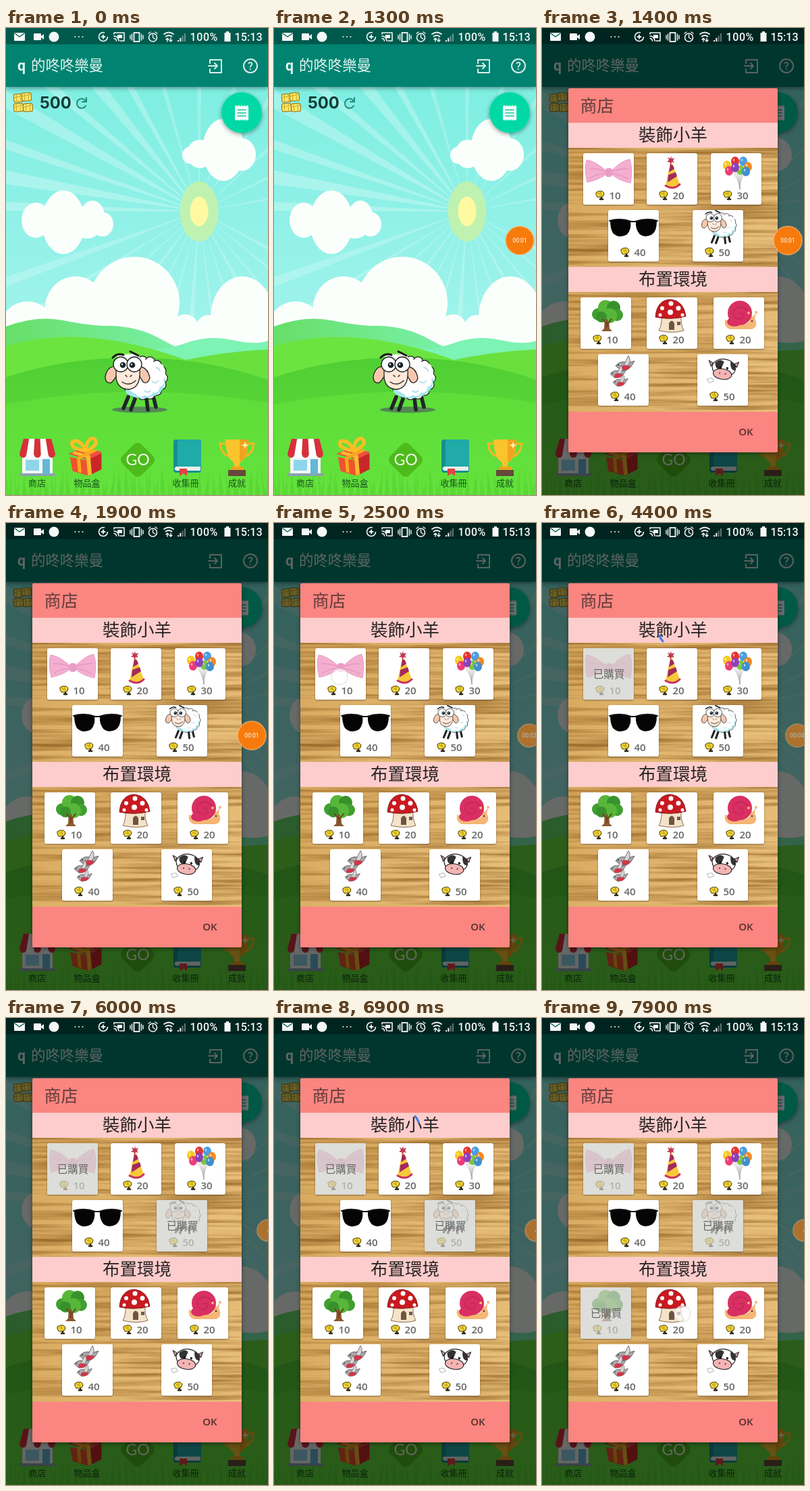
Animation, 388 px wide and 690 px high, one loop 8 s. Source, as an HTML page:

```html
<!DOCTYPE html>
<html lang="zh-Hant">
<head>
<meta charset="utf-8">
<style>
html,body{margin:0;width:100%;height:100%;overflow:hidden;background:#000}
svg{display:block;width:100vw;height:100vh}
text{font-family:"Noto Sans CJK TC","Noto Sans CJK",Roboto,sans-serif}
.latin{font-family:Roboto,sans-serif}
.price{font:600 15px "Open Sans",sans-serif;fill:#666}
.mid{text-anchor:middle}
.line{fill:none;stroke-linecap:round;stroke-linejoin:round}
</style>
</head>
<body>
<svg id="stage" viewBox="0 0 388 690" preserveAspectRatio="none"></svg>
<script>
let seed = 11;
const rand = () => (seed = seed * 16807 % 2147483647) / 2147483647;
const range = (n, f) => Array.from({length: n}, (_, i) => f(i)).join('');
const rect = (x, y, w, h, fill, more = '') => `<rect x="${x}" y="${y}" width="${w}" height="${h}" fill="${fill}" ${more}/>`;
const oval = (x, y, rx, ry, fill, more = '') => `<ellipse cx="${x}" cy="${y}" rx="${rx}" ry="${ry}" fill="${fill}" ${more}/>`;
const dot = (x, y, r, fill, more = '') => oval(x, y, r, r, fill, more);
const path = (d, fill, more = '') => `<path d="${d}" fill="${fill}" ${more}/>`;
const line = (d, color, w = 1, more = '') => `<path class="line" d="${d}" stroke="${color}" stroke-width="${w}" ${more}/>`;
const text = (x, y, size, fill, s, more = '') => `<text x="${x}" y="${y}" font-size="${size}" fill="${fill}" ${more}>${s}</text>`;
const group = (s, more = '') => `<g ${more}>${s}</g>`;
const ink = 'stroke="#222" stroke-width="1.3"';

function ray(angle, spread, opacity) {
  const p = a => `${286 + 480 * Math.cos(a * Math.PI / 180)} ${271 + 480 * Math.sin(a * Math.PI / 180)}`;
  return path(`M286 271L${p(angle - spread)}L${p(angle + spread)}Z`, '#fff', `opacity="${opacity}"`);
}

function sky() {
  const wide = [181.5, 190, 199, 210, 220, 231, 241].map((a, i) => ray(a, i % 2 ? 2 : 1.3, .26)).join('');
  const thin = range(13, i => ray(28 + i * 11, i % 3 ? .7 : 1.3, .2)) + range(7, i => ray(254 + i * 16, 1, .2));
  const puffs = [
    [85, 287, 32, 47], [44, 284, 21, 26], [128, 278, 18, 23], [143, 290, 16, 18], [120, 294, 20, 17],
    [322, 180, 31, 46], [287, 186, 19, 21], [274, 188, 13, 13], [349, 187, 21, 24],
    [190, 406, 67, 68], [103, 414, 45, 47], [32, 447, 42, 43], [265, 443, 20, 20], [300, 442, 18, 18], [350, 428, 47, 61]
  ].map(p => oval(...p, '#fbfffc')).join('');
  return rect(0, 80, 388, 420, 'url(#sky)') + wide + thin
    + oval(286, 271, 28.5, 44.5, '#bff2b0') + oval(286, 271, 13.5, 22, '#fffaa2')
    + puffs + rect(0, 440, 388, 40, '#fbfffc');
}

function land() {
  const blades = range(110, i => {
    const x = i * 3.6, h = 8 + rand() * 28;
    return path(`M${x - 2} 690L${x + rand() * 8 - 4} ${682 - h}L${x + 3} 690Z`, i % 3 ? '#52cf30' : '#6be344', 'opacity=".5"');
  });
  return path('M0 441Q45 424 85 432T150 440Q195 440 230 460T300 486V530H0Z', 'url(#far)')
    + path('M215 476Q240 474 265 466Q300 453 335 461T388 462V540H215Z', '#7df3b4')
    + path('M388 475Q310 478 225 500V550H388Z', '#6ae03f')
    + path('M0 470Q115 435 265 490L290 530H0Z', '#6ce440')
    + path('M0 516Q90 486 195 487T388 520V690H0Z', 'url(#hill)')
    + path('M0 556Q190 520 388 554V690H0Z', '#64e33c', 'opacity=".65"')
    + blades;
}

function sheep() {
  const bump = (i, more) => {
    const a = i * Math.PI * 2 / 15;
    return dot(205 + 27 * Math.cos(a), 517 + 25 * Math.sin(a), 7.3, '#fff', more);
  };
  const eye = (x, y, px) => dot(x, y, 11, '#fff', ink) + dot(px, y + 1, 4.3, '#17242c') + dot(px - 1, y, 1.2, '#fff');
  const legs = 'M181 545L174 562M191 548L185 564M208 547L210 564M218 544L222 560';
  return line(legs, '#202425', 5.5) + range(15, i => bump(i, ink)) + oval(205, 517, 29, 27, '#fff')
    + line('M233 518Q233 541 206 544Q188 545 180 537', '#a6e6ee', 6) + range(6, i => bump(i - 1, 'transform="translate(-3 -4)"'))
    + line('M216 522q6 5 10-1M205 536q5 4 9 0M222 502q5 0 6 5', '#9cd5de', 1.3)
    + path('M164 500Q150 499 147 515Q147 526 156 524Q164 516 167 506Z', '#f5c8ad', ink)
    + path('M197 500Q210 501 213 517Q210 527 203 523Q198 516 195 508Z', '#f5c8ad', ink)
    + path('M163 500Q165 487 181 486Q198 487 198 504Q200 532 182 534Q163 533 163 513Z', '#fee9da', ink)
    + range(5, i => dot(168 + i * 6.5, 488 - (i % 4 ? 2 : 0), 4.5, '#fff'))
    + eye(170, 497, 173) + eye(190, 497, 187)
    + line('M158 487Q165 480 174 483M184 478L196 484', '#171717', 3)
    + line('M172 523Q182 530 192 521M177 513l2 2M186 513l-2 2', '#372a27', 1.5);
}

function menu() {
  const shop = rect(24, 630, 45, 30, '#f3f7f7') + rect(20, 658, 53, 4, '#8aa3ad')
    + rect(29, 638, 20, 16, '#8fd5ea') + rect(54, 637, 11, 22, '#64b8d6')
    + range(5, i => path(`M${26 + i * 8.2} 607h8.3L${20 + (i + 1) * 10.6} 629a5.3 6 0 0 1-10.6 0Z`, i % 2 ? '#fff' : '#d92f3c'));
  const gift = group(path('M93 627l23-8 27 10-20 10Z', '#f04d42') + path('M95 632l25 7v23l-23-9Z', '#f0522f') + path('M120 639l22-9-2 24-20 8Z', '#c9262a')
    + path('M103 624l22 8v28l-6 2v-27l-21-8Z', '#fabd2d') + path('M130 623l-25 10v22l5 2v-21l27-10Z', '#f6a91f')
    + line('M119 625Q94 618 101 609Q113 607 119 625Q122 605 133 608Q142 617 119 625', '#ffbd25', 5), 'transform="rotate(-5 118 636)"');
  const book = rect(248, 608, 41, 49, '#168e92', 'rx="4"') + rect(254, 608, 35, 40, '#20aaa8', 'rx="2"')
    + path('M252 648h36v6h-36q-5-3 0-6', '#e6f2e9') + path('M257 651h11v11l-5-4-6 4Z', '#e44242');
  const cup = line('M325 614H317Q319 632 335 634M359 614h8Q365 632 349 634', '#f8b525', 3)
    + path('M325 608h34q-1 29-12 33l-2 7h-6l-2-7q-11-4-12-33', '#fbc32c') + path('M346 608h13q-1 29-13 33Z', '#f2a31e')
    + path('M354 611l1.500 4 4 1.500-4 1.500-1.500 4-1.500-4-4-1.500 4-1.500Z', '#fff1ac') + rect(333, 648, 18, 5, '#eca51d') + rect(329, 653, 26, 9, '#67483c');
  const go = `<rect x="175" y="618" width="40" height="40" rx="8" transform="rotate(45 195 638)" fill="#4dbb1c"/>`
    + text(195, 646, 23, '#effbe8', 'GO', 'class="mid" style="font-family:Lato,sans-serif"');
  const labels = [[46, '商店'], [120, '物品盒'], [266, '收集冊'], [342, '成就']]
    .map(([x, s]) => text(x, 677, 13, '#19531f', s, 'class="mid"')).join('');
  return shop + gift + go + book + cup + labels;
}

function topBar() {
  const bale = (x, y) => rect(x, y, 14, 12, '#f7e768', 'rx="3" stroke="#8a7220"') + line(`M${x + 4} ${y}v12M${x + 10} ${y}v12M${x + 1} ${y + 5}l12-2`, '#cda92c', 1);
  return rect(0, 24, 388, 63, '#008371', 'filter="url(#shadow)"')
    + text(17, 63, 21.3, '#e4f5f0', '<tspan class="latin" font-weight="700">q</tspan>') + text(37, 63, 21.4, '#e4f5f0', '的咚咚樂曼')
    + line('M302 52v-5h17v19h-17v-5M300 56h13m-4-4 4 4-4 4', '#d8efea', 2)
    + dot(362, 56, 10, 'none', 'stroke="#d8efea" stroke-width="2"') + text(362, 62, 16, '#d8efea', '?', 'class="mid latin" font-weight="500"')
    + group(bale(12, 97) + bale(24, 96) + bale(11, 111) + bale(25, 112), 'transform="rotate(-4 26 111)"')
    + text(50, 119, 23.8, '#123d38', '500', 'style="font:700 23.8px Inter,sans-serif"')
    + line('M118 108A7 7 0 1 0 118 115M119 103v6h-6', '#228d7a', 2)
    + dot(349, 125, 30, '#06d9a5', 'filter="url(#shadow)"')
    + path('M339 116l2-2 2 2 2-2 2 2 2-2 2 2 2-2 2 2 2-2 2 2v19l-2 2-2-2-2 2-2-2-2 2-2-2-2 2-2-2-2 2-2-2Z', '#fff')
    + line('M343 121h12M343 125.500h12M343 130h12', '#06c797', 1.7);
}

function statusIcons() {
  const w = '#f5f8f7';
  return rect(12, 7, 16, 12, w, 'rx="1"') + line('M13 8l7 5 7-5', '#006053', 1.4)
    + rect(41, 8, 11, 10, w, 'rx="1"') + path('M52 12l4-3v8l-4-3Z', w) + dot(71, 13, 7.5, w)
    + dot(102.500, 13, 1, w) + dot(108, 13, 1, w) + dot(113.500, 13, 1, w)
    + dot(144, 13, 6.5, 'none', `stroke="${w}" stroke-width="1.6" stroke-dasharray="32 9"`) + line('M141.500 13h5M144 10.500v5', w, 1.8)
    + line('M160 9V7h15v12h-6M160 12q6 0 7 7M160 15.500q3 0 3.500 3.500', w, 1.6) + rect(165, 10, 7, 5, w)
    + rect(189.500, 7, 8, 13, 'none', `stroke="${w}" stroke-width="1.8"`) + line('M186.500 9v9M184 11v5M200.500 9v9M203 11v5', w, 1.4)
    + dot(217.500, 14, 6, 'none', `stroke="${w}" stroke-width="1.6"`) + line('M217.500 10v4l3 2M211 8l3-2M224 8l-3-2', w, 1.4)
    + line('M234 9q7-5 14 0M236.500 12.500q4.500-3 9 0', w, 1.8) + line('M239 20v-5m-2 2 2-2 2 2M244 15v5m-2-2 2 2 2-2', w, 1.4)
    + range(4, i => rect(254 + i * 3.3, 18 - i * 3.3, 2, 2 + i * 3.3, w, `opacity="${i < 2 ? 1 : .4}"`))
    + text(272.500, 18.500, 16, w, '100%', 'class="latin" font-weight="500" letter-spacing=".6"') + rect(323.500, 7, 9, 13, w) + rect(326, 5, 4, 3, w)
    + text(338.500, 18.500, 16.2, w, '15:13', 'class="latin" font-weight="500"');
}

const bow = path('M34 26Q17 11 5 10Q1 23 6 43Q24 39 34 31ZM42 26Q58 10 69 9Q74 24 70 44Q52 40 42 31Z', '#f4aed0', 'stroke="#e79cc2"')
  + line('M33 27Q20 22 9 23M33 30Q20 30 10 37M43 27Q56 22 67 23M43 30Q57 32 66 38', '#e293bd', 1.2) + rect(33, 22, 10, 13, '#ea9dc4', 'rx="4"');
const hat = path('M36 10L28 48Q40 55 49 46Z', '#f7c83a') + path('M35 16l4 2 2 5-8 5ZM32 32l11-4 2 6-14 9Z', '#a12a5f')
  + line('M28 48Q40 55 49 46', '#c8325f', 3) + path('M36 4l1 4 4-1-2 4 2 3-4-1-2 4-1-4-4 0 3-3-2-4 4 2Z', '#c03a52');
const balloons = line(range(7, i => `M${25 + i * 5.500} 20Q42 36 43 53`), '#aaa', .6)
  + [[24, 18, '#f5c91f'], [36, 12, '#e8332f'], [48, 12, '#4a9ee1'], [55, 20, '#f18a24'], [27, 26, '#ed3c79'], [44, 25, '#7cc638'], [36, 21, '#8b41b9'], [52, 27, '#3f8fd0']]
    .map(([x, y, c]) => oval(x, y, 6, 7, c) + oval(x - 2, y - 2, 1.3, 2, '#fff', 'opacity=".6"')).join('');
const glasses = path('M3 16Q17 11 33 17Q35 28 28 36Q16 43 7 34Q3 27 3 16ZM41 17Q58 11 72 16Q72 31 65 36Q54 42 46 35Q40 27 41 17Z', '#050505') + line('M2 16Q18 11 34 17H40Q57 11 73 16', '#111', 2);
const woolly = group(sheep(), 'transform="translate(-69 -267) scale(.56)"');
const tree = path('M36 29h6l1 17 4 4H31l4-4Z', '#8b572e')
  + [[26, 25, 9], [37, 15, 11], [49, 15, 10], [54, 26, 9], [43, 27, 11], [31, 29, 8]].map(([x, y, r], i) => dot(x, y, r, ['#3f9f30', '#58b63a', '#37922b'][i % 3])).join('')
  + line('M39 33v11M40 39l6-7M38 38l-5-6', '#744421', 2);
const mushroom = path('M22 27Q23 40 18 49Q39 54 55 49Q50 40 51 27Z', '#f3e3c9', 'stroke="#8f6b52"') + path('M13 29Q15 4 35 3Q55 5 58 28Q36 34 13 29Z', '#c91a20', 'stroke="#801a1c"')
  + [[23, 16, 3], [36, 9, 3.5], [47, 16, 3.5], [35, 22, 4], [20, 26, 2.5], [53, 26, 2.5]].map(a => dot(...a, '#fff')).join('')
  + path('M33 48V38q4-7 8 0v10Z', '#6f5540') + rect(45, 36, 5, 5, '#6b5c50');
const snail = path('M17 33Q15 43 24 47H57Q67 43 61 31L63 23 58 29 52 23 54 34Q50 42 39 39Z', '#f6b675') + dot(39, 23, 18, '#d92f62') + oval(31, 36, 11, 7, '#d92f62')
  + line('M38 25q3-4 6 0q1 8-8 7q-10-4-5-14q11-9 21 3', '#c4285a', 1.5) + dot(52, 23, 2, '#f6b675') + dot(63, 22, 2, '#f6b675') + dot(57, 35, 1.2, '#333');
const bird = (x, y, s) => group(path('M0 7Q8-2 18 3L28 0 23 8Q18 15 8 14Z', '#aaa9ac', 'stroke="#635d64"') + path('M8 8Q16 4 22 8Q17 16 7 13Z', '#d63447') + path('M12 6L19-8Q24 0 18 7Z', '#d8d5d5', 'stroke="#777"') + dot(4, 6, 1, '#222'), `transform="translate(${x} ${y}) scale(${s})"`);
const birds = bird(26, 10, 1) + bird(18, 23, .85) + bird(22, 36, .8);
const cow = group(oval(29, 14, 20, 15, '#fff', ink) + path('M13 7Q22-2 28 4L24 18Q14 19 13 7ZM39 2Q52 4 49 16Q40 17 39 2Z', '#333')
  + oval(28, 25, 16, 9, '#f3b5b4', ink) + dot(23, 14, 2, '#111') + dot(35, 14, 2, '#111') + dot(23, 24, 1.5, '#83515a') + dot(33, 24, 1.5, '#83515a')
  + path('M9 8L2 5l5 9ZM46 5l7-4-2 9Z', '#f0aaa5', ink) + path('M3 37l8-3 4 5-8 4Z', '#fff', 'stroke="#aaa"'), 'transform="rotate(8 38 30) translate(13 8) scale(.86)"');

const cards = [
  [61, 185, 10, bow, 4300], [155, 185, 20, hat], [250, 185, 30, balloons], [98, 269, 40, glasses], [223, 269, 50, woolly, 5900],
  [57, 398, 10, tree, 7500], [155, 398, 20, mushroom], [254, 398, 20, snail], [83, 482, 40, birds], [230, 482, 50, cow]
];

function card([x, y, price, art, soldAt]) {
  const straw = line('M27 63l0 5M25 68l4 0', '#2b260c', 2.6) + path('M19 58l4-2 5 0 3 3-1 4-4 2-5 0-2-4Z', '#f0d32e', 'stroke="#463a10"') + line('M22 59l5 3M25 57l1 3', '#9c7b16', .8);
  const sold = soldAt ? group(rect(0, 0, 75, 76, '#cfcfca', 'rx="3" opacity=".7"') + text(38, 43.500, 15.5, '#656565', '已購買', 'class="mid"'), `data-sold="${soldAt}"`) : '';
  return group(rect(0, 0, 75, 76, '#fff', 'rx="3" filter="url(#soft)"') + art + straw + `<text class="price" x="38.5" y="68">${price}</text>` + sold, `transform="translate(${x} ${y})"`);
}

const wood = y => rect(39, y, 310, 177, 'url(#wood)') + rect(39, y, 310, 177, '#000', 'filter="url(#grain)"');

function dialog() {
  const heading = (y, s) => rect(39, y, 310, 37, '#fccdcc') + text(194, y + 27, 25.5, '#292323', s, 'class="mid"');
  return rect(39, 89, 310, 538, '#fb8580', 'rx="2" filter="url(#shadow)"') + text(56.500, 124, 25, '#633c3a', '商店')
    + wood(177) + wood(390) + heading(140, '裝飾小羊') + heading(353, '布置環境')
    + cards.map(card).join('') + text(302, 601.500, 15, '#56302e', 'OK', 'class="mid" style="font-family:Open Sans,sans-serif" font-weight="600"');
}

const gradient = (id, a, b, more = 'x2="0" y2="1"') => `<linearGradient id="${id}" ${more}><stop stop-color="${a}"/><stop offset="1" stop-color="${b}"/></linearGradient>`;
const shadow = (id, blur, dy) => `<filter id="${id}" x="-20%" y="-20%" width="140%" height="150%"><feDropShadow dx="0" dy="${dy}" stdDeviation="${blur}" flood-opacity=".4"/></filter>`;
const grain = `<filter id="grain" x="0" y="0" width="1" height="1" color-interpolation-filters="sRGB"><feTurbulence type="fractalNoise" baseFrequency=".005 .16" numOctaves="3" seed="4"/>
  <feColorMatrix values="0 0 0 0 .52  0 0 0 0 .32  0 0 0 0 .08  1.6 0 0 0 -.62"/></filter>`;
const stage = document.getElementById('stage');
stage.innerHTML = `<defs>${gradient('sky', '#7eeee2', '#a5f4ed')}${gradient('far', '#67df68', '#7df3b4', 'x2="1" y2="0"')}${gradient('hill', '#50cf34', '#63df3b')}${gradient('wood', '#d6a75c', '#e7be79', 'x2="1" y2=".4"')}${shadow('shadow', 3, 2)}${shadow('soft', 1, 1)}${grain}</defs>`
  + sky() + land() + oval(198, 564, 41, 4.500, '#50735a', 'opacity=".8"') + sheep() + menu() + topBar() + rect(0, 0, 388, 24, '#00594d')
  + group(rect(0, 0, 388, 690, '#000', 'opacity=".59"'), 'id="dim"') + statusIcons() + group(dialog(), 'id="dialog"')
  + group(line('M174 166.500A21 21 0 0 0 179 174.800', '#3f7ee8', 3.2), 'id="spinner"')
  + dot(0, 0, 12, '#fff', 'id="touch" fill-opacity=".65" stroke="#ccc" stroke-opacity=".7"')
  + group(dot(0, 0, 21, '#f67b0c', 'id="disc" stroke="#ffb877" stroke-width="2" stroke-opacity=".6"') + text(0, 3, 8.6, '#fff', '', 'id="clock" class="mid latin"'), 'id="bubble"');

const el = id => document.getElementById(id);
const show = (node, on) => node.setAttribute('display', on ? 'inline' : 'none');
const ease = (t, from, to) => {
  const k = Math.min(1, Math.max(0, (t - from) / (to - from)));
  return k * k * (3 - 2 * k);
};
const soldMarks = [...document.querySelectorAll('[data-sold]')];
const taps = [[2450, 97, 227], [5000, 260, 308], [6550, 94, 438], [7850, 208, 437]];
const loading = [[2700, 4450], [5150, 5900], [6700, 7500]];

function update(t) {
  const open = t >= 1380;
  show(el('dim'), open);
  show(el('dialog'), open);
  soldMarks.forEach(mark => show(mark, t >= +mark.dataset.sold));

  const spin = loading.find(([from, to]) => t >= from && t < to);
  show(el('spinner'), spin);
  el('spinner').setAttribute('transform', `rotate(${(t - 4400) * .36} 194 160)`);

  const tap = taps.find(([at]) => t >= at && t < at + 150);
  show(el('touch'), tap);
  if (tap) el('touch').setAttribute('transform', `translate(${tap[1]} ${tap[2]})`);

  const dock = ease(t, 2100, 2400), hide = ease(t, 5000, 5300);
  show(el('bubble'), t >= 200);
  el('bubble').setAttribute('transform', `translate(${364 + 14 * dock + 10 * hide} 314)`);
  el('bubble').setAttribute('opacity', 1 - .4 * dock);
  el('disc').setAttribute('rx', 21 - 4 * dock - hide);
  el('disc').setAttribute('ry', 21 - 4 * dock - hide);
  el('clock').textContent = hide < 1 ? `00:0${Math.floor(t / 1000)}` : '◂';
}

function frame(now) {
  update(now % 8000);
  requestAnimationFrame(frame);
}
update(0);
requestAnimationFrame(frame);
</script>
</body>
</html>
```
